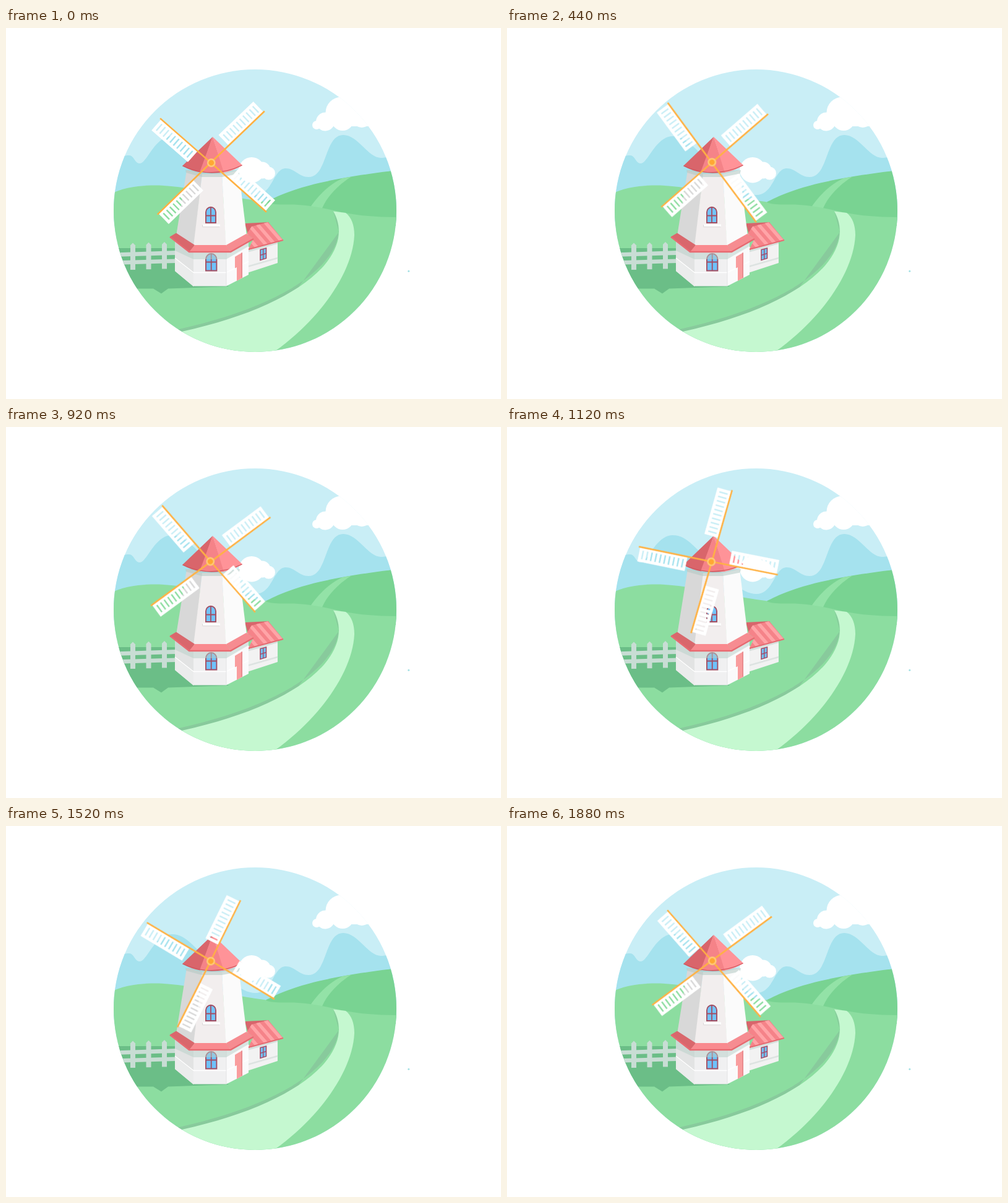
An HTML page for the animation above (1.92 s loop, 800x600 px).

```html
<!DOCTYPE html>
<html lang="en">
<head>
<meta charset="utf-8">
<title>Windmill</title>
<style>
  html, body { margin: 0; width: 100%; height: 100%; overflow: hidden; background: #fff; }
  svg { display: block; width: 800px; height: 600px; }
  #rotor {
    transform-origin: 331px 217.8px;
    animation: turn 1920ms steps(48) -2ms infinite;
  }
  @keyframes turn { to { transform: rotate(-360deg); } }
</style>
</head>
<body>
<svg viewBox="0 0 800 600">
  <defs>
    <clipPath id="disc"><circle cx="402.5" cy="295.5" r="228.5"/></clipPath>
    <clipPath id="tiles"><path d="M424 314L448 343L391 359L400 341L389 333L397 321Z"/></clipPath>

    <!-- one sail pointing right; the dashes leave see-through slots -->
    <g id="sail">
      <path d="M40 -23.7H118V-19H40ZM40 -5H118V0H40Z" fill="#fff"/>
      <path d="M40 -12H118" stroke="#fff" stroke-width="15" stroke-dasharray="4.9 2.41"/>
      <path d="M0 0H120.3" stroke="#ffb142" stroke-width="2.6"/>
    </g>

    <g id="post"><path d="M-4 391V351.5L0 347.5L4 351.5V391Z"/></g>
  </defs>

  <g clip-path="url(#disc)">
    <rect x="170" y="60" width="470" height="470" fill="#c9eef6"/>

    <!-- mountains -->
    <path fill="#a5e2ee" d="M170 214C184 209 192 206 199 206C207 206 208 219 216 219C228 219 240 175 268 175
      C292 175 306 199 330 220S378 270 403 270C431 270 432 227 452 227C467 227 473 241 489 241
      C520 241 514 173 545 173C569 173 585 210 606 210C613 210 620 208 640 204V320H170Z"/>

    <!-- clouds -->
    <g fill="#fff">
      <circle cx="502" cy="157" r="7"/>
      <circle cx="516" cy="151.5" r="15"/>
      <circle cx="542" cy="137" r="25.5"/>
      <circle cx="544" cy="148" r="18"/>
      <circle cx="575" cy="146" r="15"/>
      <path d="M540 111H610V159H540Z"/>
      <circle cx="397" cy="229.7" r="20.7"/>
      <circle cx="414" cy="230" r="13.5"/>
      <circle cx="424.5" cy="235" r="10.5"/>
    </g>

    <!-- hills -->
    <path fill="#79d392" d="M410 287C450 264 500 245 640 229V320H410Z"/>
    <path fill="#93e2a7" d="M544 243C524 252 506 269 491 291L510 294C517 275 535 255 558 240.5Z"/>
    <path fill="#8cdda0" d="M170 268C200 253 245 252 285 258C330 266 380 276 418 281C430 287 445 285 465 285.5
      C505 288 520 293 548 299C575 304 600 306 640 306V530H170Z"/>

    <!-- road -->
    <path fill="#88ca9c" d="M529 296C542 322 541 346 518 374C482 420 398 461 276 488L290 493L450 450L538 330Z"/>
    <path fill="#c5f8d0" d="M529 296.5C544 322 540 350 519 378C484 424 400 466 284 491L280 530H424
      C500 480 560 400 563 335C563 318 558 306 549 299Z"/>

    <!-- shadow and fence -->
    <path fill="#6bbe87" d="M174 356H275L360 418L262 421.5L251 429.5L238 421.5H200Z"/>
    <g fill="#c8ddd4">
      <path d="M174 363.5L275 360V367L174 370ZM174 376.5L275 373.5V380L174 383Z"/>
      <use href="#post" x="205"/>
      <use href="#post" x="230.5" y="-.7"/>
      <use href="#post" x="256" y="-1.5"/>
    </g>
  </g>

  <!-- annex -->
  <path fill="#f2f2f2" d="M390 355L439 343V380L390 396Z"/>
  <path fill="#d6e0dc" d="M390 358L439 345V349L390 363Z"/>
  <path d="M390 386L439 372" stroke="#dde3e1" stroke-width="2.5"/>
  <path fill="#d7666c" d="M386 316L425 314L392 337Z"/>
  <g clip-path="url(#tiles)">
    <path fill="#f58389" d="M380 310H450V362H380Z"/>
    <path d="M381 326l34 40M393 319l38 44M405 316l38 44M417 312l38 44" stroke="#ffa4a7" stroke-width="5.5"/>
  </g>
  <path d="M391 358.3L448 343" stroke="#e66b72" stroke-width="2"/>
  <path d="M411 358.5L420.5 356V372.5L411 375.5Z" fill="#72c3fa" stroke="#a34e6a" stroke-width="1.6"/>
  <path d="M415.7 357V374M411 367.5L420.5 364.5" stroke="#a34e6a" stroke-width="1.4"/>

  <!-- base -->
  <path fill="#e2e3e3" d="M273 343L303 361V418L273 393Z"/>
  <path fill="#f0f0f1" d="M303 361H356V417.5H303Z"/>
  <path fill="#fafafb" d="M356 361L392 344V399L356 417.5Z"/>
  <path fill="#ebecec" d="M273 373L303 397V418L273 393Z"/>
  <path d="M273 372L303 395.5H356L371 388M381 383L392 377.5" fill="none" stroke="#fff" stroke-width="1.5"/>
  <path d="M356 362V417" stroke="#e2e2e4"/>
  <path fill="#f99d9e" d="M370 370L382 363V404L373 409V387L370 388.5Z"/>
  <path d="M381.2 363.5V404" stroke="#e5868a" stroke-width="1.6"/>
  <path d="M323 392.5V374A8.7 9 0 0 1 340.4 374V392.5Z" fill="#6fc1fa" stroke="#a34e62" stroke-width="1.9"/>
  <path d="M331.7 365V392.5M323 378.5H340.4" stroke="#a34e62" stroke-width="1.8"/>
  <path fill="#b7cfc8" fill-opacity=".5" d="M273 343L303 361H356L392 344V353L356 374H303L273 360Z"/>

  <!-- tower -->
  <path fill="#d8d8d8" d="M292 230L317 236L304 353L275 336Z"/>
  <path fill="#f2eeee" d="M317 236H349L356 353H303Z"/>
  <path fill="#fbfbfb" d="M349 236L376 230L389 336L355.5 353Z"/>
  <path fill="#b3c9c4" fill-opacity=".55" d="M290 230H378L376.5 235.5L349 241H316L291 234Z"/>
  <path d="M323 315V298A8 8.3 0 0 1 339 298V315Z" fill="#72c3fa" stroke="#a34e62" stroke-width="1.9"/>
  <path d="M331 290V315M323 303.5H339" stroke="#a34e62" stroke-width="1.8"/>
  <path fill="#fff" d="M317 317.5H346V322H317Z"/>
  <path d="M317.5 318V321.7H345.5" fill="none" stroke="#d9d6d6"/>

  <!-- skirt roof -->
  <path fill="#d9676c" d="M275 331.5L305 351L297 362L265 337.5Z"/>
  <path fill="#f98a8f" d="M305 351H356L363 362H296Z"/>
  <path fill="#f68c91" d="M356 351L388 333L400 340.5L363 362Z"/>
  <path d="M265 337.8L296 362H363L400 341" fill="none" stroke="#e76a71" stroke-width="2.4"/>

  <!-- cap -->
  <path fill="#d9656b" d="M334 176L285 223Q299 231 314 233.5Z"/>
  <path fill="#f58388" d="M334 176L313 233Q333 235.5 353 233.7Z"/>
  <path fill="#ff9398" d="M334 176L382 222Q368 231 352 233.7Z"/>
  <path d="M285.5 223Q333 245 381.5 222" fill="none" stroke="#cf565e" stroke-width="1.3"/>

  <g id="rotor">
    <g transform="translate(331 217.8)">
      <use href="#sail" transform="rotate(-138.8) translate(-11.5)"/>
      <use href="#sail" transform="rotate(-43.8)"/>
      <use href="#sail" transform="rotate(41.6)"/>
      <use href="#sail" transform="rotate(135.8)"/>
      <circle cx=".8" cy=".2" r="6.9" fill="#ffc978"/>
      <circle cx=".8" cy=".2" r="4.4" fill="#ffa833"/>
    </g>
  </g>

  <circle cx="650.8" cy="393.3" r="1.5" fill="#a3e0e4"/>
</svg>
</body>
</html>
```
